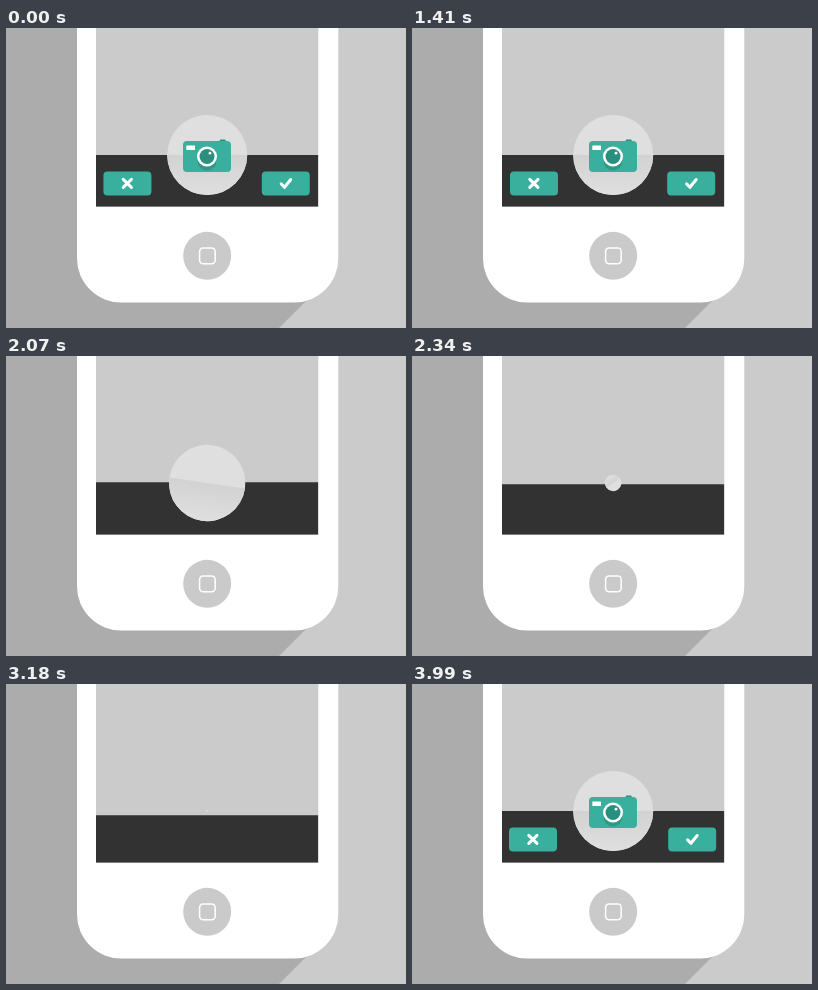
Write an HTML page with a canvas that moves like this. It is 400 px wide and 300 px high and loops after 4.02 s.

```html
<!DOCTYPE html>
<html lang="en">
<head>
<meta charset="utf-8">
<title>Camera toolbar</title>
<style>
html, body { margin: 0; width: 100%; height: 100%; overflow: hidden; background: #cbcbcb; }
canvas { display: block; width: 400px; height: 300px; }
</style>
</head>
<body>
<canvas id="stage"></canvas>
<script>
const LOOP = 4020, STEP = 30, MIRROR = 5546, DURATION = 650;
const TEAL = '#38b09d', TEAL_DARK = '#2b8f80', GREY = '#cbcbcb';
const canvas = document.getElementById('stage');
const ctx = canvas.getContext('2d');
const ratio = window.devicePixelRatio || 1;
canvas.width = 400 * ratio;
canvas.height = 300 * ratio;

const progress = (time, start) => Math.min(1, Math.max(0, (time - start) / DURATION));
const easeOut = u => 1 - (1 - u) ** 5;
const easeOver = u => 1 + 2.5 * (1 - u) ** 4 - 3.5 * (1 - u) ** 5;

function box(x, y, w, h, r, color) {
  ctx.beginPath();
  ctx.roundRect(x, y, w, h, r);
  ctx.fillStyle = color;
  ctx.fill();
}

function disc(x, y, r, color) {
  ctx.beginPath();
  ctx.arc(x, y, r, 0, Math.PI * 2);
  ctx.fillStyle = color;
  ctx.fill();
}

function line(points, width) {
  ctx.beginPath();
  points.forEach(([x, y], i) => i ? ctx.lineTo(x, y) : ctx.moveTo(x, y));
  ctx.strokeStyle = '#fff';
  ctx.lineWidth = width;
  ctx.lineCap = ctx.lineJoin = 'round';
  ctx.stroke();
}

function drawPhone() {
  ctx.fillStyle = GREY;
  ctx.fillRect(0, 0, 400, 300);
  ctx.beginPath();
  [[0, 0], [200, 0], [310, 263], [273, 300], [0, 300]].forEach(p => ctx.lineTo(...p));
  ctx.fillStyle = '#acacac';
  ctx.fill();
  box(71, -60, 261.3, 334.5, 44, '#fff');
  box(90, 0, 222.3, 179, 0, GREY);
  disc(201.2, 227.8, 24, '#cacaca');
  ctx.beginPath();
  ctx.roundRect(193.6, 220.1, 15.6, 15.6, 3.5);
  ctx.strokeStyle = '#fff';
  ctx.lineWidth = 1.5;
  ctx.stroke();
}

function drawButton(x, icon) {
  ctx.save();
  ctx.translate(x, 155.4);
  box(-24, -12, 48, 24, 4, TEAL);
  icon.forEach(points => line(points, 3));
  ctx.restore();
}

function drawDial(scale) {
  if (scale <= 0) return;
  ctx.save();
  ctx.translate(201.2, 127);
  ctx.rotate((1 - scale) * Math.PI);
  ctx.scale(scale, scale);
  disc(0, 0, 40, '#dfdfdf');
  const shade = ctx.createLinearGradient(0, 0, 0, 40);
  shade.addColorStop(0, '#d2d2d2');
  shade.addColorStop(1, '#dfdfdf');
  ctx.beginPath();
  ctx.arc(0, 0, 40, 0, Math.PI);
  ctx.fillStyle = shade;
  ctx.fill();
  ctx.restore();
}

function drawCamera(scale) {
  if (scale <= 0) return;
  ctx.save();
  ctx.translate(201, 128);
  ctx.scale(scale, scale);
  box(12.7, -16.6, 6, 4, 1, TEAL_DARK);
  box(-24, -15, 48, 31, 4, TEAL);
  box(-20.7, -10.5, 8.7, 4.5, 0.5, '#fff');
  disc(0, 5, 9.5, '#2f9987');
  disc(0, 0.5, 10, '#fff');
  disc(0, 0.5, 7.5, TEAL_DARK);
  disc(3, -2.8, 1.4, '#fff');
  ctx.restore();
}

const CROSS = [[[-4.2, -4], [4, 4]], [[4, -4], [-4.2, 4]]];
const CHECK = [[[-4.6, 0.5], [-1.3, 3.9], [5, -3.9]]];

function draw(now) {
  const t = Math.floor(now % LOOP / STEP) * STEP;
  // The exit replays the entrance backwards.
  const time = t < 1000 ? t + LOOP : t < MIRROR / 2 ? MIRROR - t : t;

  ctx.setTransform(ratio, 0, 0, ratio, 0, 0);
  drawPhone();

  ctx.save();
  ctx.beginPath();
  ctx.rect(90, 0, 222.3, 178.6);
  ctx.clip();
  const bar = progress(time, 3035);
  if (bar > 0) box(90, 179 - 52 * easeOver(bar), 222.3, 80, 0, '#323232');
  const slide = progress(time, 3540);
  if (slide > 0) {
    const shift = 78.6 * easeOver(slide);
    drawButton(200.6 - shift, CROSS);
    drawButton(200.6 + shift, CHECK);
  }
  drawDial(easeOut(progress(time, 3177)));
  drawCamera(easeOut(progress(time, 3500)));
  ctx.restore();
}

const origin = performance.now();
function tick() {
  draw(performance.now() - origin);
  requestAnimationFrame(tick);
}
tick();
</script>
</body>
</html>
```
